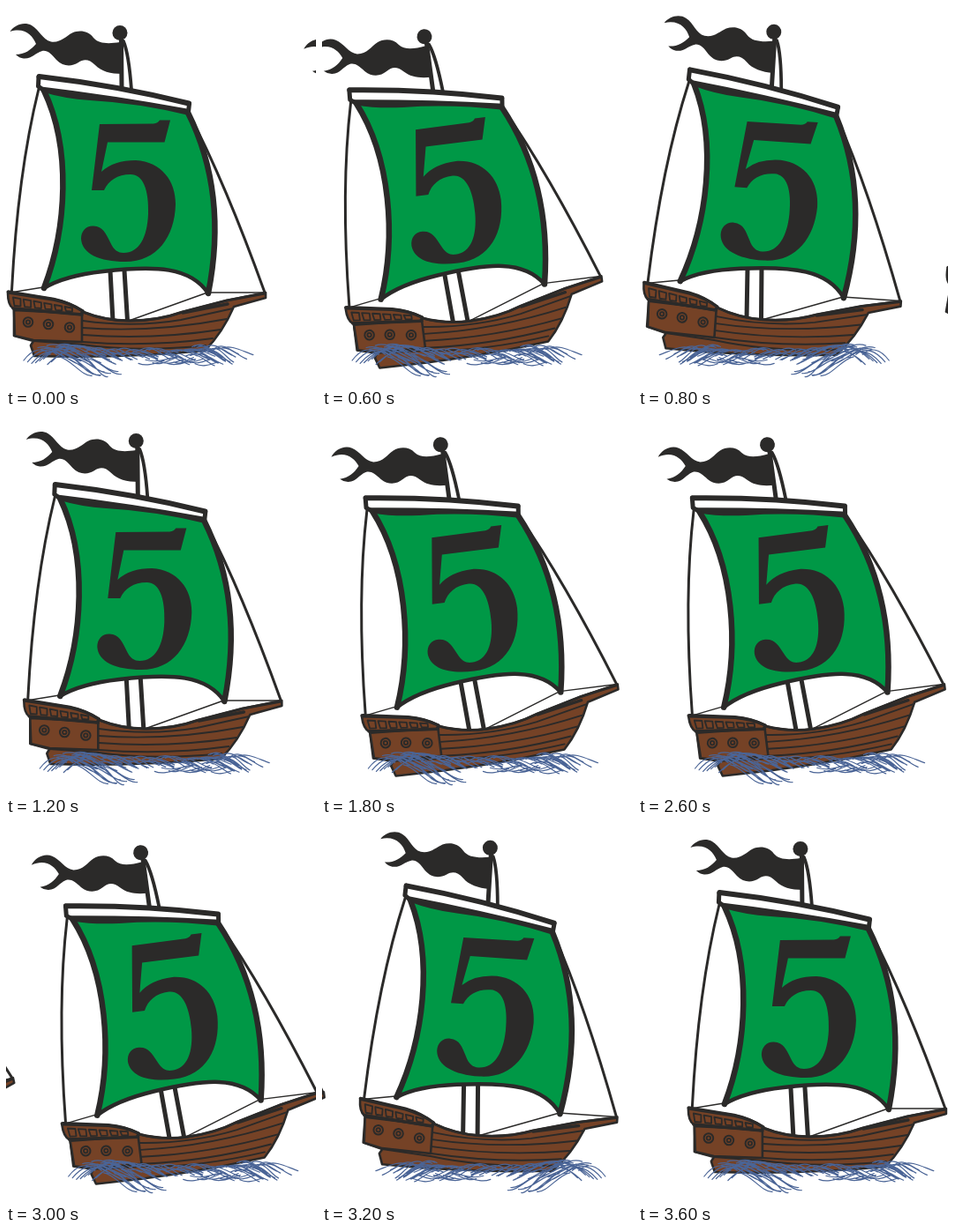
An HTML page that plays this animation: 351 px wide and 431 px high, repeating every 3.8 s.

```html
<!DOCTYPE html>
<html lang="en">
<head>
<meta charset="utf-8">
<title>Sailing ship</title>
<style>
  html, body { margin: 0; width: 100%; height: 100%; overflow: hidden; background: #fff; }
  svg { display: block; width: 100%; height: 100%; }
  .ink { fill: #2b2a29; }
  .line { fill: none; stroke: #2b2a29; stroke-linecap: round; stroke-linejoin: round; }
  .wood { fill: #754226; stroke: #2b2a29; stroke-width: 2.6; stroke-linejoin: round; }
  .foam { fill: none; stroke: #4a6496; stroke-width: 1.2; stroke-linecap: round; }
</style>
</head>
<body>
<svg viewBox="0 0 351 431">
  <defs>
    <g id="ship">
      <!-- mast and flag -->
      <path fill="#fff" d="M131 40L139 60L143 95L131 92ZM117 303H133L138 358L121 357Z"/>
      <path class="line" stroke-width="5" stroke-linecap="butt" d="M130.500 38L131 93M118 300L121 357M134 300L137.500 357"/>
      <path class="line" stroke-width="3.800" d="M133 40Q139 54 142 95"/>
      <path class="ink" d="M4.500 29C9 22 20 17 29 22C38 27 41 38 51 40.500C62 42 68 34 75 30.500C83 27 93 28 99 36C105 43 116 43 129 41L132 77C118 77 108 74 101 67C94 60 88 60 82 64C74 69 65 69 57 61C51 54 47 50 41 51C33 53 30 60 20 59.500Q15 59 11 55C21 55 28 50 34 43C30 33 21 24 4.500 29Z"/>
      <circle class="ink" cx="129" cy="30.500" r="8.500"/>
      <!-- rigging -->
      <path class="line" stroke-width="3" d="M37 94C22 155 11 235 6.500 323"/>
      <path class="line" stroke-width="3" d="M208 124C238 181 266 250 293 325"/>
      <path class="line" stroke-width="1.400" d="M5 325L42 319M228 325H293M139 357L228 325"/>
      <!-- sail -->
      <path fill="#009846" d="M43 96Q90 106 140 107Q175 112 206 121C230 169 247 235 229 326C209 296 170 294 110 301Q66 306 43 320C69 252 74 161 43 96Z"/>
      <path class="line" stroke-width="6.500" d="M43 96C74 161 69 252 43 320M206 121C230 169 247 235 229 326"/>
      <path class="line" stroke-width="4.500" d="M43 320Q66 306 110 301C170 294 209 296 229 326"/>
      <path fill="#fff" d="M37 80Q125 90 207 110L206 121Q130 104 38 92Z"/>
      <path class="line" stroke-width="6" d="M37.500 80Q125 90 207 110.500"/>
      <path class="ink" d="M36 91Q120 101 208 117L207 124Q150 110 95 107Q66 105 43 98Z"/>
      <path class="line" stroke-width="5" d="M37 80L36.500 91L43 96M207.500 111L206.500 120"/>
      <path class="ink" d="M106 134L167 133.500Q172 133 174 129.500H186L179.500 154.500H115L108 188Q122 175 147 175C176 177 192 198 192 225C191 262 171 290 135 290C106 290 86 281 85 264C85 255 91 249 99 249.500C110 250 113 258 118 268C122 277 127 280 133 280C151 280 160 262 161 236C162 208 155 191 141 191C126 191 116 198 111 209H97Z"/>
      <!-- hull -->
      <path class="wood" d="M9 344L87 347Q112 357 140 357Q172 357 200 347L250 334L294 325V331L258 341Q245 371 225 391Q130 400 32 397L28 385L31 380L9 374Z"/>
      <path class="line" stroke-width="3" d="M87 347Q112 357 140 357Q172 357 200 347L250 334L293 326"/>
      <path class="line" stroke-width="3.500" d="M200 348L251 338"/>
      <path class="line" stroke-width="1.900" d="M87 357Q145 365 198 356L257 343M87 365Q165 371 250 355M87 373Q165 379 243 367M87 381Q160 387 234 377M31 380L86 384Q150 393 226 385"/>
      <path class="wood" d="M9 345L86 349V381L31 379L10 374Z"/>
      <path class="wood" d="M2 325Q1 323 5 324L54 332Q73 336 87 346L84 350L8 343Q2 339 2 325Z"/>
      <path class="line" stroke-width="3.500" d="M3 325L54 333Q73 337 87 346M8 343L86 350"/>
      <g id="trim"></g>
    </g>
    <g id="waves" class="foam"></g>
  </defs>
  <g id="view"></g>
</svg>
<script>
const W = 351, STEP = 200, COUNT = 19, DRIFT = 3.05;
const ANGLES = [0, -7.15, -13, -7.15, 4, 10];
const $ = id => document.getElementById(id);

function addTrim() {
  let s = '';
  for (let i = 0; i < 6; i++) {
    const x = 8 + 11.7 * i, y = 330.5 + 2.1 * i, h = 9.5 - 0.9 * i;
    s += `<path class="line" stroke-width="1.8" d="M${x} ${y}l8.5 1.6v${h - 1}l-7 -.6z"/>`;
  }
  for (const [x, y] of [[25, 358.5], [48, 361], [72, 364.5]]) {
    s += `<circle class="line" stroke-width="2" cx="${x}" cy="${y}" r="5.3"/>
      <circle class="line" stroke-width="1.8" cx="${x}" cy="${y}" r="2.2"/>`;
  }
  $('trim').innerHTML = s;
}

function addWaves() {
  let seed = 7, d = '';
  const rnd = n => (seed = seed * 16807 % 2147483647) / 2147483647 * n;
  const f = v => v.toFixed(1);
  // Each group is a row of S-shaped strands: rise first, then sag.
  const strands = (n, x, gap, y, dx, dy, lift) => {
    for (let i = 0; i < n; i++) {
      const w = dx + rnd(14), h = dy + rnd(9);
      d += `M${f(x + i * gap)} ${f(y + rnd(7))}c${f(w * 0.35)} ${f(-lift)} `
        + `${f(w * 0.7)} ${f(h - lift * 0.6)} ${f(w)} ${f(h)}`;
    }
  };
  strands(8, 20, 4.5, 400, 30, -15, 14);
  strands(15, 36, 3.4, 383, 36, 9, 5);
  strands(9, 60, 4, 393, 30, 17, -2);
  strands(26, 84, 5.2, 390, 28, 2, 7);
  strands(9, 150, 8, 400, 22, -8, -4);
  strands(16, 203, 2.6, 386, 24, 6, 6);
  $('waves').innerHTML = `<path d="${d}"/>`;
}

// Cells lie side by side, so a ship can overhang into its neighbours.
function cell(i, shown) {
  if (i < 0 || i >= COUNT) return '';
  const pose = i % 6, x = (i - shown) * W + i * DRIFT;
  const wave = pose > 3 ? 'translate(292 0) scale(-1 1)' : `translate(${pose ? 5 : 0} 0)`;
  return `<g transform="translate(${x} 0)">
    <use href="#ship" transform="rotate(${ANGLES[pose]} 152 210)"/>
    <use href="#waves" transform="${wave}"/></g>`;
}

let last = -1;
function draw(t) {
  const i = Math.floor(t / STEP) % COUNT;
  if (i !== last) {
    last = i;
    $('view').innerHTML = cell(i - 1, i) + cell(i, i) + cell(i + 1, i);
  }
}

addTrim();
addWaves();
draw(0);
const start = performance.now();
(function tick() {
  draw(performance.now() - start);
  requestAnimationFrame(tick);
})();
</script>
</body>
</html>
```
